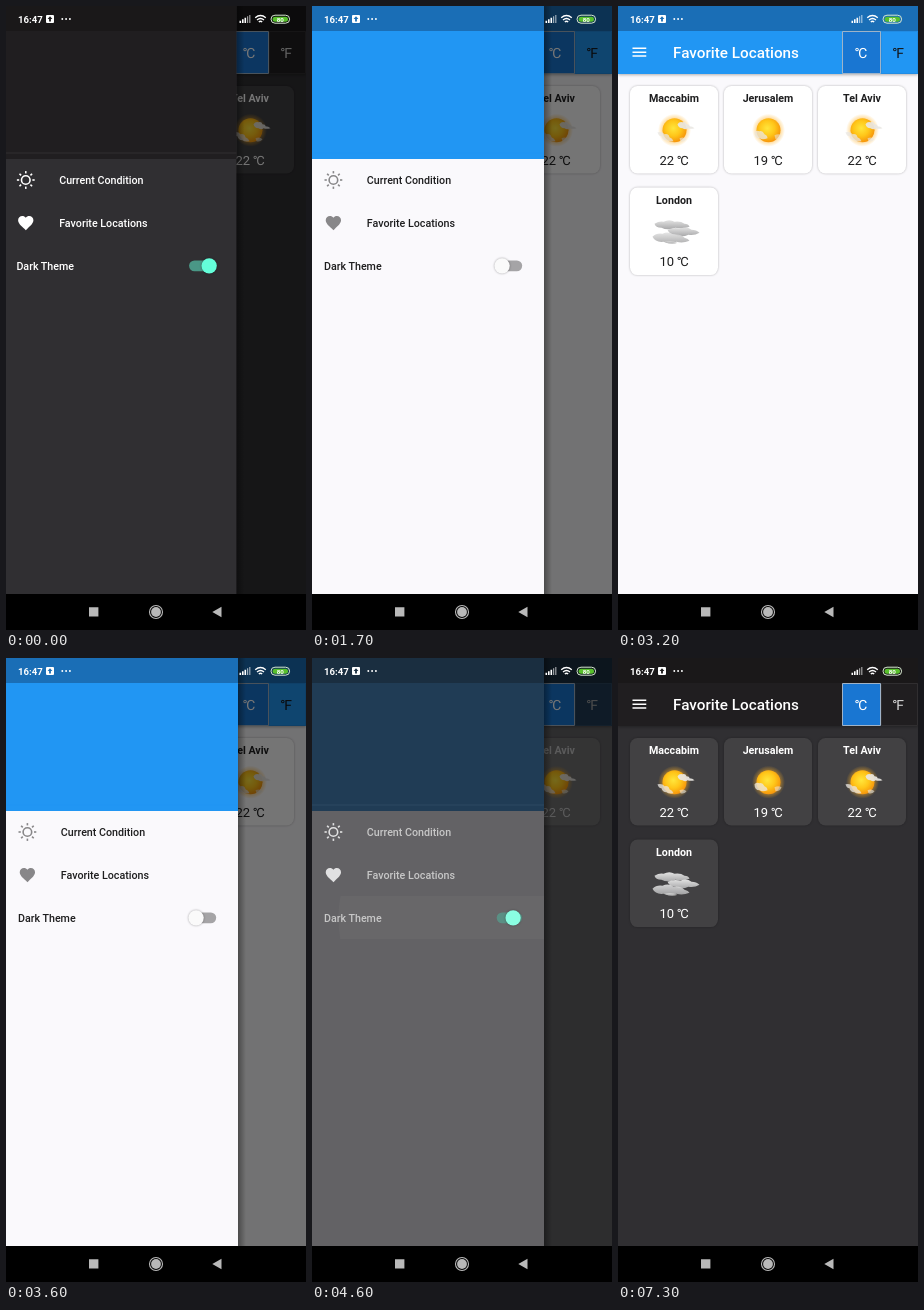
Animation of 300x624 px, one loop 7500 ms. Source, as an HTML page:

```html
<!DOCTYPE html>
<html lang="en">
<head>
<meta charset="utf-8">
<title>Favorite Locations</title>
<style>
  html, body { margin: 0; width: 100%; height: 100%; overflow: hidden; background: #000; }
  svg { display: block; width: 100vw; height: 100vh; }
  text { font-family: Roboto, "Noto Sans CJK JP", sans-serif; }
  .title { font-size: 15.25px; font-weight: 500; fill: #fff; }
  .unit { font-size: 14px; text-anchor: middle; }
  .item { font-size: 10.7px; font-weight: 500; fill: var(--ink); }
  .city { font-size: 10.7px; font-weight: 700; text-anchor: middle; fill: var(--ink); }
  .temp { font-size: 13px; text-anchor: middle; fill: var(--ink); }
  .card { fill: var(--card); filter: drop-shadow(0 .8px .8px rgba(0, 0, 0, .28)); }
  .bar { fill: var(--bar); filter: drop-shadow(0 1px 1.5px rgba(0, 0, 0, .3)); }
</style>
</head>
<body>
<svg viewBox="0 0 300 624">
  <defs>
    <radialGradient id="disc" cx=".45" cy=".42" r=".58">
      <stop offset="0" stop-color="#ffe63c"/>
      <stop offset=".55" stop-color="#ffc619"/>
      <stop offset="1" stop-color="#f6960c"/>
    </radialGradient>
    <radialGradient id="glow">
      <stop offset=".6" stop-color="#ffb020" stop-opacity=".6"/>
      <stop offset="1" stop-color="#ffb020" stop-opacity="0"/>
    </radialGradient>
    <linearGradient id="edge">
      <stop offset="0" stop-opacity=".35"/>
      <stop offset="1" stop-opacity="0"/>
    </linearGradient>
    <linearGradient id="puff" x2="0" y2="1">
      <stop offset="0" stop-color="#e2e2e2"/>
      <stop offset="1" stop-color="#a9a9aa"/>
    </linearGradient>
    <filter id="soft" x="-20%" y="-30%" width="140%" height="160%"><feGaussianBlur stdDeviation=".55"/></filter>
    <clipPath id="tile"><path d="M0 238h232v43H0z"/></clipPath>
    <g id="sun">
      <circle r="16.5" fill="url(#glow)"/>
      <circle r="12" fill="url(#disc)"/>
    </g>
    <g id="sunCloud">
      <use href="#sun"/>
      <g filter="url(#soft)" fill="#e9e7e3">
        <path d="M3-6q2-3 5-2 3-1 4 2 3 0 3 2 3 0 5 2-4 1-7 0-2 2-5 0-4 0-5-4z" opacity=".92"/>
        <path d="M-17 2q5-1 7 2 4-1 5 3 3 1 4 4-5 1-7-1-4 0-5-4-3 0-4-4z" opacity=".75"/>
        <path d="M5 8q4-2 7 1 -2 3-6 2z" opacity=".6"/>
      </g>
    </g>
    <g id="sunWisp">
      <use href="#sun"/>
      <g filter="url(#soft)" fill="#ece6d8">
        <path d="M-14 2q2-2 5-1 3-1 5 3 3 1 3 4-5 2-8 0-5 0-5-6z" opacity=".8"/>
        <path d="M6 5q4-2 7 0-1 4-6 4z" opacity=".55"/>
      </g>
    </g>
    <g id="cloud" filter="url(#soft)" fill="url(#puff)">
      <path d="M-20-8q5-3 9-2 6-3 11 0 6-1 10 2 4 0 5 3-7 3-14 1-8 3-14 0-6 0-7-4z"/>
      <path d="M-7-2q7-3 13-1 6-3 11 1 5 0 8 3-5 3-11 2-7 3-13 0-6 0-8-5z"/>
      <path d="M-22 5q4-4 10-3 6-3 11 1 7-1 11 3 4 1 5 3-7 3-13 1-7 3-13 0-8 1-11-5z" opacity=".9"/>
      <path d="M-10 10q7-2 13 1-6 3-13-1z" opacity=".7"/>
    </g>
  </defs>

  <path fill="var(--page)" d="M0 0h300v588H0z"/>
  <g id="cards"></g>
  <path class="bar" d="M0 25h300v43H0z"/>
  <path fill="var(--status)" d="M0 0h300v25H0z"/>
  <path fill="#fff" transform="translate(12.2 37) scale(.765)" d="M3 18h18v-2H3zm0-5h18v-2H3zm0-7v2h18V6z"/>
  <text class="title" x="55" y="51.8">Favorite Locations</text>
  <path fill="none" stroke="var(--line)" d="M263.5 25.5h36v42h-36z"/>
  <path fill="#1976d2" stroke="#9fb3c8" d="M224.5 25.5h38v42h-38z"/>
  <text class="unit" x="243.2" y="51.7" fill="#fff">℃</text>
  <text class="unit" x="280.5" y="51.7" fill="var(--off)">℉</text>

  <path id="scrim" d="M0 0h300v588H0z"/>
  <g id="drawer">
    <path fill="url(#edge)" d="M232 0h8v588h-8z"/>
    <path fill="var(--page)" d="M0 0h232v588H0z"/>
    <path fill="var(--bar)" d="M0 25h232v128H0z"/>
    <path fill="var(--status)" d="M0 0h232v25H0z"/>
    <path fill="var(--rule)" d="M0 146.5h232v1H0z"/>
    <g clip-path="url(#tile)"><circle id="ripple" cy="260" fill="var(--splash)"/></g>
    <g id="bright" transform="translate(21.4 174)" fill="none" stroke="var(--icon)" stroke-width="1.6">
      <circle r="4.3"/>
    </g>
    <path fill="var(--icon)" transform="translate(12.2 207.8) scale(.765)" d="M12 21.35l-1.45-1.32C5.4 15.36 2 12.28 2 8.5 2 5.42 4.42 3 7.5 3c1.74 0 3.41.81 4.5 2.09C13.09 3.81 14.76 3 16.5 3 19.58 3 22 5.42 22 8.5c0 3.78-3.4 6.86-8.55 11.54z"/>
    <text class="item" x="54.8" y="178">Current Condition</text>
    <text class="item" x="54.8" y="221">Favorite Locations</text>
    <text class="item" x="12" y="263.8">Dark Theme</text>
    <rect x="184.7" y="254.5" width="25.5" height="10.7" rx="5.35" fill="var(--track)"/>
    <circle id="thumb" cy="259.8" r="7.65" fill="var(--thumb)" style="filter:drop-shadow(0 .8px .8px rgba(0,0,0,.35))"/>
  </g>

  <g fill="#fff">
    <text x="12" y="16.8" font-size="9.6" font-weight="700">16:47</text>
    <rect x="40" y="9" width="8" height="8" rx="1"/>
    <path d="M44 10.3l2.4 2.6h-1.5v2.6h-1.8v-2.6h-1.5z" fill="var(--status)"/>
    <circle cx="56.3" cy="13" r=".95"/><circle cx="60.1" cy="13" r=".95"/><circle cx="63.9" cy="13" r=".95"/>
    <path d="M233.5 14.8h1.6V17h-1.6zM236 13.3h1.6V17H236zM238.5 11.8h1.6V17h-1.6z"/>
    <path d="M241 10.3h1.2V17H241zM243.2 9h1.2v8h-1.2z" opacity=".6"/>
    <g fill="none" stroke="#fff" stroke-width="1.3">
      <path d="M249.2 11.8q5.3-4.6 10.6 0M251 14q3.5-3 7 0"/>
      <path d="M252.8 16q1.7-1.6 3.4 0" />
    </g>
    <rect x="265" y="9.2" width="18.6" height="8" rx="4" fill="none" stroke="#d6e8cf"/>
    <rect x="266.6" y="10.7" width="15.4" height="5" rx="2.5" fill="#58c02c"/>
    <text x="274.3" y="15.5" font-size="6.2" font-weight="700" text-anchor="middle">80</text>
  </g>

  <path d="M0 588h300v36H0z"/>
  <g fill="#b9b9b9">
    <path d="M83 601.2h9.4v9.4H83zM215.5 600.8v10.4l-9.2-5.2z"/>
    <circle cx="150" cy="606" r="4.9"/>
    <circle cx="150" cy="606" r="6.5" fill="none" stroke="#b9b9b9" stroke-width="1.1"/>
  </g>
</svg>

<script>
const $ = id => document.getElementById(id);
const clamp = v => Math.min(1, Math.max(0, v));
const LOOP = 7500, STEP = 100, WIDTH = 232;

// name: [dark rgba, light rgba]
const THEME = {
  page: [[48, 47, 50, 1], [250, 249, 252, 1]],
  bar: [[32, 30, 32, 1], [33, 150, 243, 1]],
  status: [[26, 24, 25, 1], [26, 110, 182, 1]],
  card: [[66, 65, 67, 1], [255, 255, 255, 1]],
  ink: [[255, 255, 255, 1], [30, 30, 31, 1]],
  icon: [[255, 255, 255, 1], [136, 135, 137, 1]],
  off: [[215, 215, 215, 1], [20, 20, 22, 1]],
  line: [[48, 46, 48, 1], [33, 140, 228, 1]],
  rule: [[48, 46, 49, 1], [33, 150, 243, 1]],
  track: [[100, 255, 218, .5], [0, 0, 0, .34]],
  thumb: [[100, 255, 218, 1], [250, 250, 250, 1]],
  splash: [[255, 255, 255, .125], [120, 120, 120, .16]]
};

const CITIES = [
  ["Maccabim", 22, "sunCloud"], ["Jerusalem", 19, "sunWisp"],
  ["Tel Aviv", 22, "sunCloud"], ["London", 10, "cloud"]
];
$("cards").innerHTML = CITIES.map(([city, temp, icon], i) => `
  <g transform="translate(${12 + i % 3 * 94} ${80 + Math.floor(i / 3) * 101.6})">
    <rect class="card" width="88" height="87.5" rx="7.5"/>
    <text class="city" x="44" y="16">${city}</text>
    <use href="#${icon}" x="44.5" y="44.2"/>
    <text class="temp" x="44" y="78.5">${temp} ℃</text>
  </g>`).join("");

for (let a = 0; a < 360; a += 45)
  $("bright").insertAdjacentHTML("beforeend", `<path d="M0-6.6v-2.3" transform="rotate(${a})"/>`);

// Drawer moves: [start, end position]
const MOVES = [[2360, 0], [3210, 1], [4760, 0]];
const TAPS = [{ down: 1030, up: 1400 }, { down: 4430, up: 4450 }];

// Critically damped spring, 1 -> 0
function spring(ms) {
  const x = ms * .0224, rest = (1 + x) * Math.exp(-x);
  return rest < .002 ? 0 : rest;
}

function drawerAt(t) {
  if (t < 300) return .993;
  const move = MOVES.filter(m => m[0] <= t).pop();
  if (!move) return 1;
  const rest = spring(t - move[0]);
  return move[1] ? 1 - rest : rest;
}

function drawRipple(t) {
  const tap = TAPS.find(p => t > p.down && t < p.up + 200);
  const ripple = $("ripple");
  ripple.setAttribute("opacity", tap ? 1 - clamp((t - tap.up) / 200) : 0);
  if (!tap) return;
  const held = Math.min(t, tap.up) - tap.down;
  const grow = clamp(held / 1000 + Math.max(0, t - tap.up) / 250);
  ripple.setAttribute("cx", 190 - 74 * grow);
  ripple.setAttribute("r", 190 * grow);
}

function draw(t) {
  const light = clamp((t - 1400) / 200) - clamp((t - 4450) / 200);
  for (const [name, [dark, bright]] of Object.entries(THEME)) {
    const rgba = dark.map((v, i) => v + (bright[i] - v) * light);
    document.documentElement.style.setProperty("--" + name, `rgba(${rgba.join()})`);
  }
  const open = drawerAt(t);
  $("drawer").setAttribute("transform", `translate(${(open - 1) * WIDTH})`);
  $("drawer").style.display = open ? "" : "none";
  $("scrim").setAttribute("opacity", .54 * open);
  $("thumb").setAttribute("cx", 204.8 - 14.7 * light);
  drawRipple(t);
}

const start = performance.now();
function tick() {
  const t = (performance.now() - start) % LOOP;
  draw(Math.floor(t / STEP) * STEP);
  requestAnimationFrame(tick);
}
tick();
</script>
</body>
</html>
```
